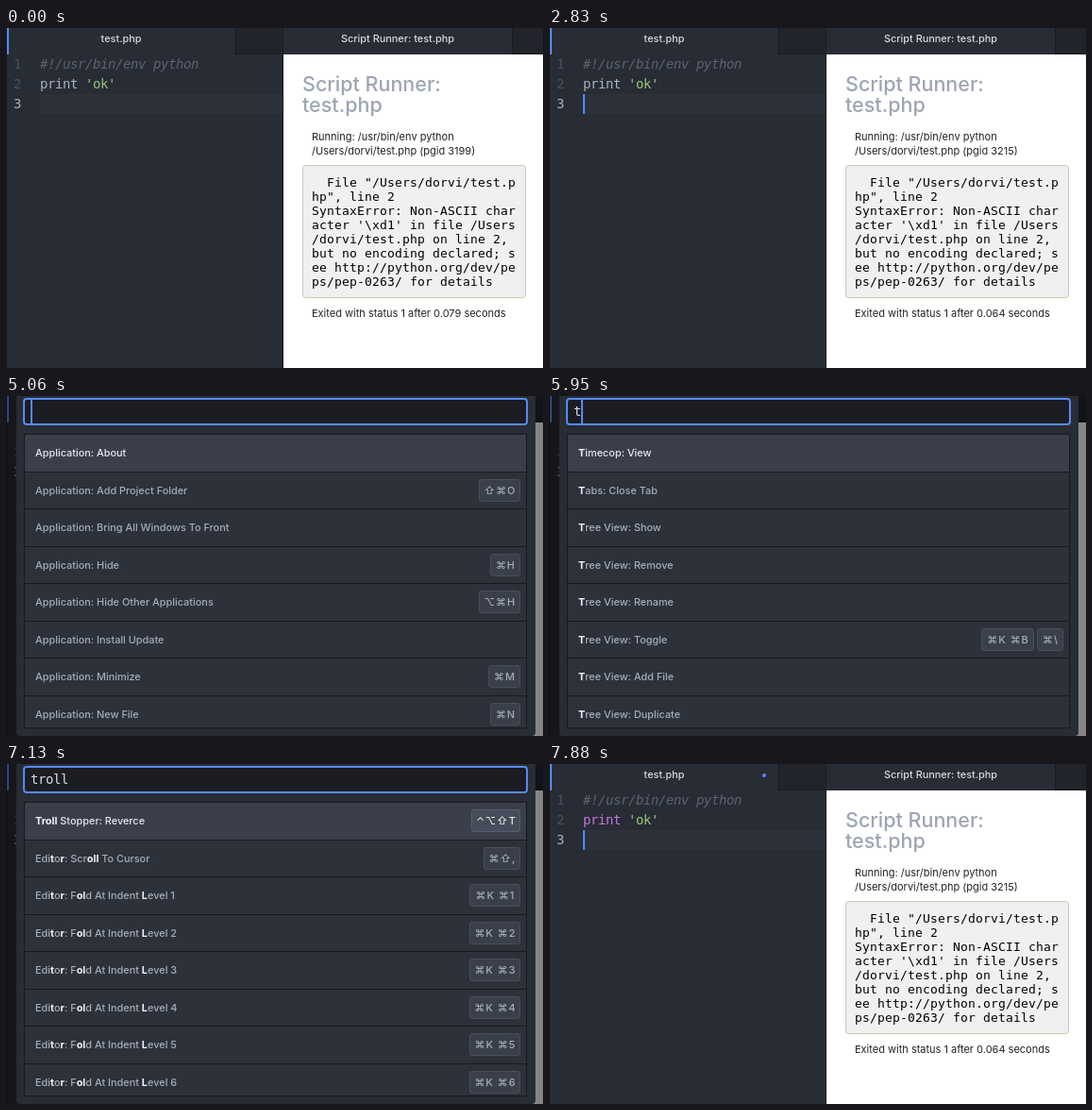
An HTML page with a canvas that plays this animation: 569 px wide and 360 px high, repeating every 8 s.

```html
<!DOCTYPE html>
<html lang="en">
<head>
<meta charset="utf-8">
<title>Script Runner</title>
<style>
  html, body { margin: 0; width: 100%; height: 100%; overflow: hidden; background: #282c34; }
  canvas { display: block; }
</style>
</head>
<body>
<canvas id="stage" width="569" height="360"></canvas>
<script>
const ctx = document.getElementById('stage').getContext('2d');
const LOOP = 8000;
const CELL = 8;
const UI = 'Inter, "DejaVu Sans", sans-serif';
const LABEL = `500 10.9px ${UI}`;
const STRONG = `700 10.9px ${UI}`;
const BODY = `11px ${UI}`;
const MONO = '"DejaVu Sans Mono", monospace';
const BLUE = '#568af2', LINE = '#181a1f', BASE = '#282c34', BAR = '#21252b';
const PALE = '#d7dae0', MUTED = '#9da5b4';

// Times at which the caret flips in the editor and in the palette.
const EDITOR_BLINKS = [450, 900, 1200, 1640, 2080, 2380, 2830, 3280, 3570, 4020, 4460, 4910];
const PALETTE = { open: 5060, close: 7580 };
const KEYSTROKES = [5800, 6240, 6390, 6540, 6680];

const numbered = (n, make) => Array.from({ length: n }, (_, i) => make(i + 1));

// Rows are [label with *matches*, ...[key label, badge width]].
const LISTS = [
  { at: 5060, rows: [
    ['Application: About'],
    ['Application: Add Project Folder', ['⇧⌘O', 44]],
    ['Application: Bring All Windows To Front'],
    ['Application: Hide', ['⌘H', 32]],
    ['Application: Hide Other Applications', ['⌥⌘H', 44]],
    ['Application: Install Update'],
    ['Application: Minimize', ['⌘M', 34]],
    ['Application: New File', ['⌘N', 32]]
  ] },
  { at: 5950, rows: [
    ['*T*imecop: View'],
    ['*T*abs: Close Tab'],
    ['*T*ree View: Show'],
    ['*T*ree View: Remove'],
    ['*T*ree View: Rename'],
    ['*T*ree View: Toggle', ['⌘\\', 28], ['⌘K ⌘B', 56]],
    ['*T*ree View: Add File'],
    ['*T*ree View: Duplicate']
  ] },
  { at: 6390, rows: [
    ['*Tr*ee View: Show'],
    ['*Tr*ee View: Remove'],
    ['*Tr*ee View: Rename'],
    ['*Tr*ee View: Toggle', ['⌘\\', 28], ['⌘K ⌘B', 56]],
    ['*Tr*ee View: Add File'],
    ['*Tr*ee View: Duplicate'],
    ['*Tr*ee View: Add Folder'],
    ['*Tr*ee View: Reveal Active File', ['⌘⇧\\', 39]]
  ] },
  { at: 6540, rows: [
    ['*Tro*ll Stopper: Reverce', ['⌃⌥⇧T', 52]],
    ['Edi*t*o*r*: Scr*o*ll To Cursor', ['⌘⇧,', 39]],
    ...numbered(6, n => [`*Tr*ee View: *O*pen Selected Entry In Pane ${n}`, [`⌘${n}`, 30]])
  ] },
  { at: 6680, rows: [
    ['*Troll* Stopper: Reverce', ['⌃⌥⇧T', 52]],
    ['Edi*t*o*r*: Scr*oll* To Cursor', ['⌘⇧,', 39]],
    ...numbered(6, n => [`Edi*t*o*r*: F*ol*d At Indent *L*evel ${n}`, [`⌘K ⌘${n}`, 54]])
  ] }
];

const ERROR = [
  '  File "/Users/dorvi/test.p',
  'hp", line 2',
  'SyntaxError: Non-ASCII char',
  "acter '\\xd1' in file /Users",
  '/dorvi/test.php on line 2, ',
  'but no encoding declared; s',
  'ee http://python.org/dev/pe',
  'ps/pep-0263/ for details'
];

const passed = (times, t) => times.filter(at => at <= t).length;

function rect(x, y, w, h, color) {
  ctx.fillStyle = color;
  ctx.fillRect(x, y, w, h);
}

function box(x, y, w, h, r, fill, stroke, weight = 1) {
  ctx.beginPath();
  ctx.roundRect(x + weight / 2, y + weight / 2, w - weight, h - weight, r);
  ctx.fillStyle = fill;
  ctx.fill();
  ctx.strokeStyle = stroke;
  ctx.lineWidth = weight;
  ctx.stroke();
}

function text(str, x, y, color, font = BODY, align = 'left') {
  ctx.font = font;
  ctx.textAlign = align;
  ctx.fillStyle = color;
  ctx.fillText(str, x, y);
}

// Monospace text sits on whole-pixel cells.
function mono(str, x, y, color, size = 14, style = '') {
  ctx.font = `${style} ${size}px ${MONO}`;
  ctx.letterSpacing = `${CELL - ctx.measureText('0').width}px`;
  text(str, x, y, color, ctx.font);
  ctx.letterSpacing = '0px';
}

function drawEditor(t) {
  const reverted = t >= PALETTE.close;
  rect(0, 0, 294, 360, BASE);
  rect(243, 0, 50, 28, BAR);
  rect(243, 0, 1, 28, LINE);
  rect(243, 27, 50, 1, LINE);
  rect(36, 70, 257, 21, '#2c313a');
  rect(0, 0, 1, 360, LINE);
  rect(1, 0, 2, 28, BLUE);
  rect(293, 0, 1, 360, LINE);
  text('test.php', 122, 15, PALE, LABEL, 'center');
  if (t >= 7880) {
    ctx.beginPath();
    ctx.arc(228, 12, 2, 0, Math.PI * 2);
    ctx.fillStyle = BLUE;
    ctx.fill();
  }

  ['1', '2', '3'].forEach((n, i) => mono(n, 8, 43 + 21 * i, i === 2 ? '#abb2bf' : '#495162'));
  mono('#!/usr/bin/env python', 36, 43, '#5c6370', 14, 'italic');
  mono('print', 36, 64, reverted ? '#c678dd' : '#abb2bf');
  mono("'ok'", 36 + 6 * CELL, 64, '#98c379');
  if (reverted || passed(EDITOR_BLINKS, t) % 2) rect(36, 70, 2, 21, '#528bff');
}

function drawRunner(t) {
  const ink = '#222';
  rect(294, 0, 275, 360, '#fff');
  rect(294, 0, 242, 28, BASE);
  rect(536, 0, 33, 28, BAR);
  rect(536, 0, 1, 28, LINE);
  rect(536, 27, 33, 1, LINE);
  text('Script Runner: test.php', 415, 15, PALE, LABEL, 'center');

  const heading = `500 21.5px ${UI}`;
  text('Script Runner:', 314, 67, MUTED, heading);
  text('test.php', 314, 89, MUTED, heading);
  text('Running: /usr/bin/env python', 324, 119, ink);
  text(`/Users/dorvi/test.php (pgid ${t < 1490 ? 3199 : 3215})`, 324, 134, ink);

  box(314, 145, 237, 141, 3, '#f0f0f0', '#c9c9b4');
  ERROR.forEach((line, i) => mono(line, 324, 168 + 15 * i, '#000', 13));

  const seconds = t < 1490 ? '0.079' : '0.064';
  if (t < 1490 || t >= 1640) text(`Exited with status 1 after ${seconds} seconds`, 324, 306, ink);
}

function drawLabel(label, x, y, color) {
  label.split('*').forEach((part, i) => {
    const match = i % 2;
    text(part, x, y, match ? '#f0f2f5' : color, match ? STRONG : LABEL);
    x += ctx.measureText(part).width;
  });
}

function drawRow([label, ...keys], i) {
  const selected = i === 0;
  const middle = Math.round(60.4 + 39.5 * i);
  const top = Math.round(40 + 39.5 * i) + 1;
  const bottom = Math.round(79.5 + 39.5 * i);
  const color = selected ? '#e6e8ec' : '#a5adba';
  rect(20, top, 531, bottom - top, selected ? '#3a3f4b' : '#2d313a');
  drawLabel(label, 31, middle + 4, color);

  let right = 545;
  for (const [key, width] of keys) {
    box(right - width, middle - 12, width, 24, 2.5, selected ? '#464c59' : '#3a3f49', selected ? '#565d6b' : '#484e5a');
    ctx.letterSpacing = '1px';
    text(key, right - width / 2 + 0.5, middle + 4, color, `500 11px ${UI}`, 'center');
    ctx.letterSpacing = '0px';
    right -= width + 3;
  }
}

function drawPalette(t) {
  rect(0, 0, 569, 360, 'rgba(0, 0, 0, 0.48)');
  ctx.beginPath();
  ctx.roundRect(11, -8, 550, 368, 4);
  ctx.fillStyle = BASE;
  ctx.fill();

  const typed = passed(KEYSTROKES, t);
  box(18, 2, 535, 29, 3, '#1b1d23', BLUE, 2);
  mono('troll'.slice(0, typed), 26, 21, PALE);
  const caretHidden = (t >= 5350 && t < KEYSTROKES[0]) || t >= 7130;
  if (!caretHidden) rect(26 + CELL * typed, 4, 2, 25, BLUE);

  // The dark backing shows through between rows as separators.
  rect(19, 40, 533, 312, LINE);
  ctx.save();
  ctx.beginPath();
  ctx.rect(20, 41, 531, 310);
  ctx.clip();
  LISTS.findLast(list => list.at <= t).rows.forEach(drawRow);
  ctx.restore();
}

function draw(now) {
  const t = now % LOOP;
  ctx.clearRect(0, 0, 569, 360);
  drawEditor(t);
  drawRunner(t);
  if (t >= PALETTE.open && t < PALETTE.close) drawPalette(t);
}

let start;
function tick(now) {
  start ??= now;
  draw(now - start);
  requestAnimationFrame(tick);
}
draw(0);
requestAnimationFrame(tick);
</script>
</body>
</html>
```
